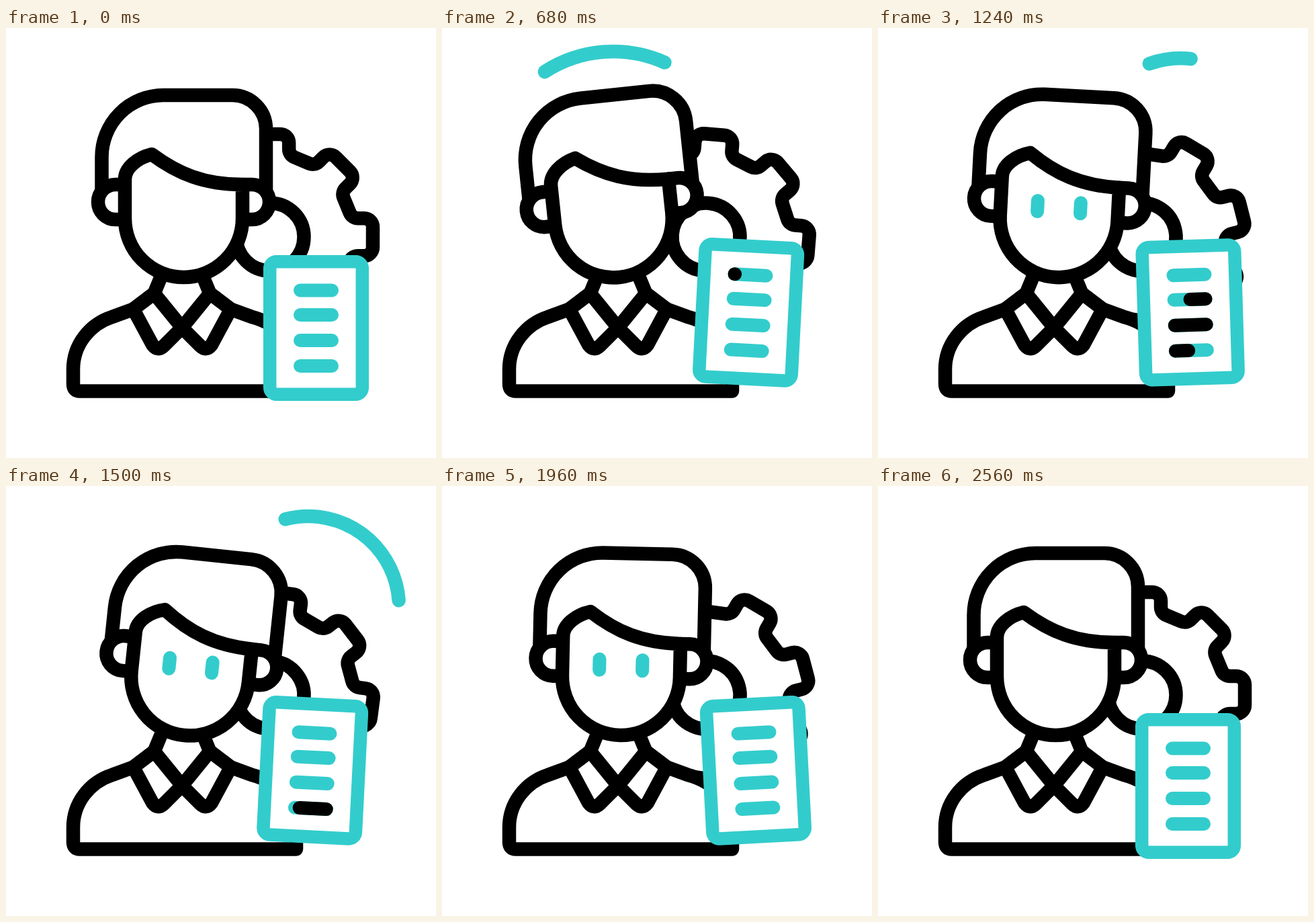
These frames come from a looping animation (640x640 px, 2660 ms). An HTML page with a canvas:

```html
<!DOCTYPE html>
<html>
<head>
<meta charset="utf-8">
<style>
  html, body { margin: 0; width: 100%; height: 100%; overflow: hidden; background: #fff; }
  canvas { display: block; }
</style>
</head>
<body>
<canvas id="stage" width="640" height="640"></canvas>
<script>
const ctx = document.getElementById('stage').getContext('2d');
const LOOP = 2660, BLACK = '#000', CYAN = '#3cc', RAD = Math.PI / 180;

// Smooth 0..1 progress between two times
const ease = (t, from, to) => {
  const x = Math.min(1, Math.max(0, (t - from) / (to - from)));
  return x * x * (3 - 2 * x);
};
const shapes = (...list) => list.map(d => new Path2D(d));

const neck = new Path2D('M230 360L220.5 395L262 446L303.5 395L294 360Z');
const body = shapes(
  'M303.5 395L334.5 418.5L366 430C408 441 432 472 432 508V540.5H110Q100 540.5 100 530V508C100 472 124 441 158 430L189.5 418.5L220.5 395',
  'M230 372L220.5 395M294 372L303.5 395',
  'M189.5 418.5L220.5 395L262 446L235 473Q226 482 218 471.5Z',
  'M334.5 418.5L303.5 395L262 446L289 473Q298 482 306 471.5Z'
);
const head = shapes(
  'M142.5 240V192A92 92 0 0 1 234 100H337A50 50 0 0 1 387 150V245',
  'M177 233H163A26 26 0 0 0 163 285H177',
  'M352 233H366A26 26 0 0 1 366 285H352',
  'M352 283.5V233C295 233 256 217 217 188C196 193 177 208 177 225V283.5A87.5 87.5 0 0 0 352 283.5Z'
);
const gear = makeGear();

function makeGear() {
  const corners = [];
  for (let i = 0; i < 8; i++) {
    const c = Math.cos(i * 45 * RAD), s = Math.sin(i * 45 * RAD);
    for (const [x, y] of [[-28, -122], [-28, -153], [28, -153], [28, -122]])
      corners.push([x * c - y * s, x * s + y * c]);
  }
  const path = new Path2D();
  path.moveTo(0, -153);
  for (let i = 2; i < 34; i++)
    path.arcTo(...corners[i % 32], ...corners[(i + 1) % 32], 13);
  path.closePath();
  return path;
}

function outline(paths, color = BLACK, width = 20.5) {
  ctx.strokeStyle = color;
  ctx.lineWidth = width;
  for (const p of paths) {
    ctx.fill(p);
    ctx.stroke(p);
  }
}

function line(x1, y1, x2, y2, color) {
  ctx.strokeStyle = color;
  ctx.lineWidth = 20;
  ctx.beginPath();
  ctx.moveTo(x1, y1);
  ctx.lineTo(x2, y2);
  ctx.stroke();
}

function turned(x, y, degrees, draw) {
  ctx.save();
  ctx.translate(x, y);
  ctx.rotate(degrees * RAD);
  ctx.translate(-x, -y);
  draw();
  ctx.restore();
}

// Arc from angle a to b (clockwise from the top), drawn in and then erased from its start
function swoosh(t, start, x, y, r, a, b) {
  const tip = ease(t, start, start + 400), tail = ease(t, start + 360, start + 590);
  if (tip <= tail) return;
  const at = k => (a + (b - a) * k - 90) * RAD;
  ctx.strokeStyle = CYAN;
  ctx.lineWidth = 20.5;
  ctx.beginPath();
  ctx.arc(x, y, r, at(tail), at(tip), b < a);
  ctx.stroke();
}

function drawGear(t) {
  const x = Math.max(0, Math.min(t / 1290, (2560 - t) / 1270));
  const angle = 260 * (0.65 * ease(x, 0, 1) + 0.35 * x);
  ctx.save();
  ctx.translate(393, 311);
  ctx.rotate(angle * RAD);
  outline([gear]);
  ctx.beginPath();
  ctx.arc(0, 0, 50.5, 0, 7);
  ctx.stroke();
  ctx.restore();
}

function drawHead(t) {
  const tilt = -6 * ease(t, 217, 690) + 12 * ease(t, 690, 1510) - 6 * ease(t, 1510, 2150);
  turned(264, 372, tilt, () => {
    outline(head);
    const open = ease(t, 720, 900) - ease(t, 2060, 2240);
    if (open <= 0) return;
    for (const x of [232, 296]) {
      ctx.save();
      ctx.translate(x, 266.5);
      ctx.scale(open, open);
      line(0, -8, 0, 8, CYAN);
      ctx.restore();
    }
  });
}

function drawSheet(t) {
  const lift = 23 * (ease(t, 100, 610) - ease(t, 2100, 2500));
  let swing = 3 * ease(t, 300, 710) + 3 * ease(t, 1940, 2350);
  for (let i = 0; i < 3; i++)
    swing += (i % 2 ? 6 : -6) * ease(t, 710 + 410 * i, 1120 + 410 * i);
  ctx.save();
  ctx.translate(0, -lift);
  turned(461, 342, swing, () => {
    const page = new Path2D();
    page.roundRect(392.7, 347.8, 137.6, 197.4, 10);
    outline([page], CYAN, 19.5);
    [390.5, 427, 465, 503].forEach((y, i) => {
      line(438, y, 485, y, CYAN);
      const on = 671 + 168 * i, off = 1015 + 150 * i;
      const tip = ease(t, on, on + 150), tail = ease(t, off, off + 150);
      if (tip > tail) line(438 + 47 * tail, y, 438 + 47 * tip, y, BLACK);
    });
  });
  ctx.restore();
}

function frame(now) {
  const t = now % LOOP;
  ctx.fillStyle = '#fff';
  ctx.fillRect(0, 0, 640, 640);
  ctx.lineCap = ctx.lineJoin = 'round';
  drawGear(t);
  ctx.fill(neck);
  outline(body);
  drawHead(t);
  drawSheet(t);
  swoosh(t, 290, 255, 223, 188, 27, -33);
  swoosh(t, 1110, 450, 180, 135, -20, 86);
  requestAnimationFrame(frame);
}
requestAnimationFrame(frame);
</script>
</body>
</html>
```
